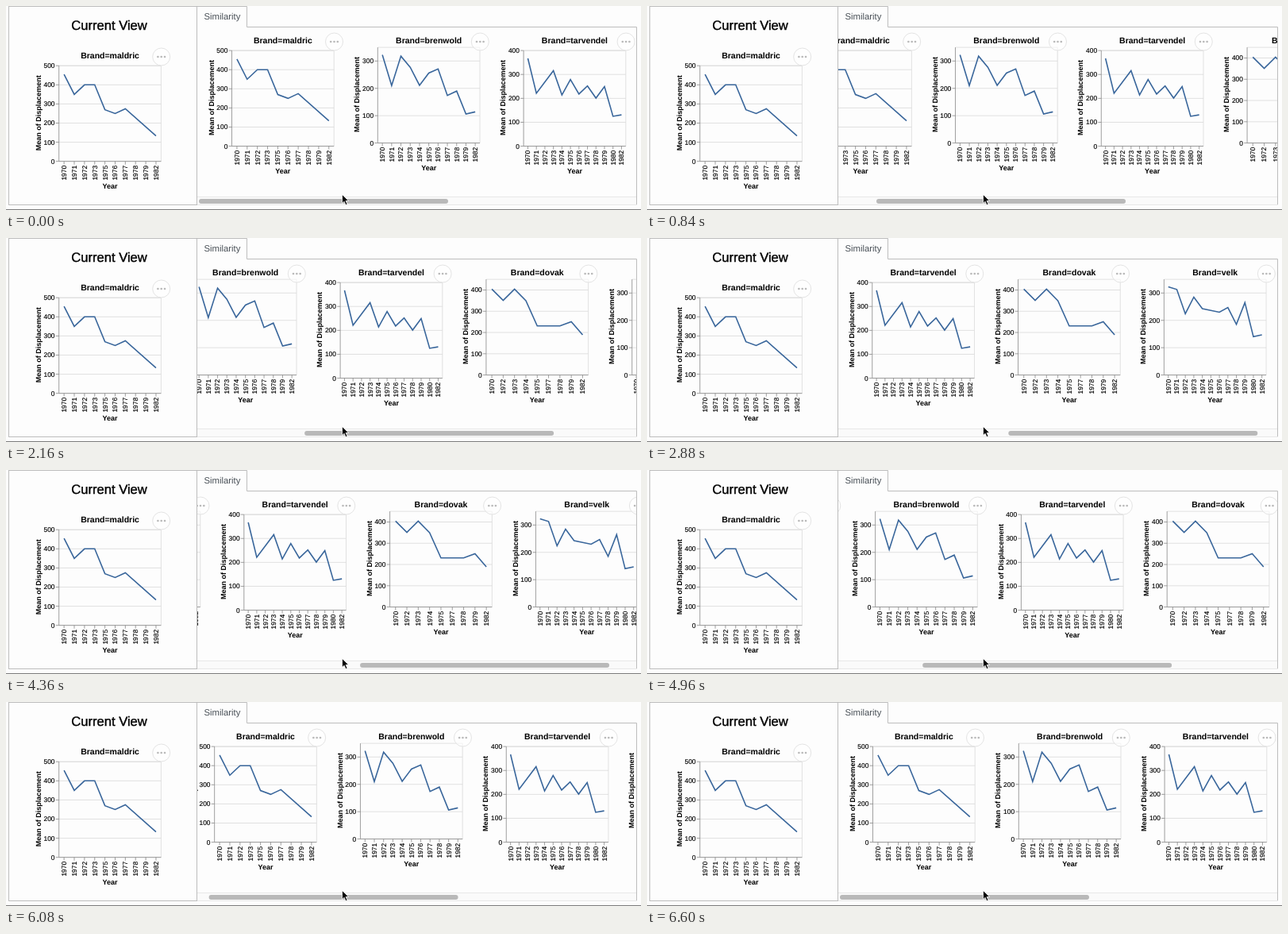
An HTML page for the animation above (7760 ms loop, 800 px wide and 257 px high).

```html
<!DOCTYPE html>
<html lang="en">
<head>
<meta charset="utf-8">
<title>Similarity view</title>
<style>
  html, body { margin: 0; width: 100%; height: 100%; overflow: hidden; background: #fdfdfd; }
  svg { display: block; font-family: "Liberation Sans", Arial, sans-serif; text-rendering: geometricPrecision; }
  .panel { fill: none; stroke: #bdbdbd; }
  .grid { fill: none; stroke: #dadada; stroke-width: .8; }
  .axis { fill: none; stroke: #888; stroke-width: .8; }
  .series { fill: none; stroke: #39669b; stroke-width: 1.6; }
  .label { font-size: 8.4px; stroke: #000; stroke-width: .15; }
  .axis-title { font-size: 9px; font-weight: bold; text-anchor: middle; }
  .title { font-size: 10.5px; font-weight: bold; text-anchor: middle; }
  .end { text-anchor: end; }
  .menu circle { fill: #fff; fill-opacity: .6; stroke: #e4e4e4; }
  .menu path { stroke: #bababa; stroke-width: 2.7; stroke-linecap: round; }
</style>
</head>
<body>
<svg width="800" height="257" viewBox="0 0 800 257">
  <defs><clipPath id="view"><rect x="241" y="27" width="554" height="213"/></clipPath></defs>
  <rect width="800" height="257" fill="#fdfdfd"/>
  <path d="M0 256.5H800" stroke="#7c7c7c"/>
  <rect class="panel" x="3.5" y=".5" width="237" height="250"/>
  <text x="130" y="30.3" font-size="16.6" text-anchor="middle" stroke="#000" stroke-width=".4">Current View</text>
  <g id="current"></g>

  <text x="249.5" y="17.2" font-size="11.3" fill="#495057">Similarity</text>
  <g clip-path="url(#view)"><g id="strip"></g></g>
  <rect x="241" y="240" width="554" height="10" fill="#fafafa"/>
  <path d="M241 240.5H795M241 250.5H795" stroke="#e8e8e8"/>
  <rect id="thumb" x="243" y="243" width="314" height="6" rx="3" fill="#b9b9b9"/>
  <path class="panel" d="M241 .5H303.5V26.5H794.5V250"/>
  <path d="M423.5 237.5v11.2l2.6-2.4 1.9 4.3 2-.9-1.9-4.2h3.6z" fill="#000" stroke="#fff" stroke-width=".8"/>
</svg>
<script>
const LOOP = 7760, STEP = 40;
const PLOT_W = 128.7, PLOT_H = 120.5, SPACING = 183.8;
const SCROLL_RATIO = 1.735, DECAY = 4;

// Key values only: blanks lie on the straight line between their neighbours.
const brands = [
  { name: "maldric", missing: [1974, 1980], keys: [455, 350, 400, 400, 270, 250, 275, , , 133] },
  { name: "brenwold", missing: [1980], keys: [323, 210, 318, 277, 211, 256, 271, 174, 190, 106, 114] },
  { name: "tarvendel", missing: [], keys: [367, 221, , 316, 214, 279, 218, 252, 201, 249, 125, 131] },
  { name: "dovak", missing: [1971, 1976, 1980], keys: [404, 351, 404, 350, 231, , 231, 251, 189] },
  { name: "velk", missing: [], keys: [323, 313, 224, 285, 243, , 230, 247, 185, 265, 140, 147] }
];

const swipes = [
  { start: 480, end: 1360, to: 120, attack: 1.6 },
  { start: 1760, end: 3240, to: 372, attack: 1.53 },
  { start: 4040, end: 5240, to: 165, attack: 2.8 },
  { start: 5360, end: 6600, to: 0, attack: 1.7 }
];

const text = (cls, x, y, str, turned) =>
  `<text class="${cls}" transform="translate(${x} ${y})${turned ? " rotate(-90)" : ""}">${str}</text>`;
const path = (cls, d) => `<path class="${cls}" d="${d}"/>`;

const yearsWithout = missing =>
  Array.from({ length: 13 }, (_, i) => 1970 + i).filter(year => year !== 1981 && !missing.includes(year));
const domainMax = keys => Math.ceil(Math.max(...keys.filter(Boolean)) / 50) * 50;

function chart({ name, missing, keys }, left, top, titleY) {
  const years = yearsWithout(missing), max = domainMax(keys);
  const bottom = top + PLOT_H, right = left + PLOT_W, middle = left + PLOT_W / 2;
  const xAt = i => left + PLOT_W * (i + .5) / years.length;
  const yAt = value => bottom - PLOT_H * value / max;
  let grid = `M${left} ${top}H${right}V${bottom}`;
  let axis = `M${left} ${top}V${bottom}H${right}`;
  let labels = "";
  for (let value = 0; value <= max; value += 100) {
    const y = yAt(value);
    grid += `M${left} ${y}H${right}`;
    axis += `M${left - 4} ${y}H${left}`;
    labels += text("label end", left - 5.2, y + 2.9, value);
  }
  years.forEach((year, i) => {
    axis += `M${xAt(i)} ${bottom}v4`;
    labels += text("label end", xAt(i) + 2.9, bottom + 5.2, year, true);
  });
  const points = [];
  keys.forEach((value, i) => points.push(`${xAt(i)} ${yAt(value)}`));
  return path("grid", grid) + path("axis", axis) + path("series", "M" + points.join("L")) + labels
    + text("axis-title", middle, bottom + 34.3, "Year")
    + text("axis-title", left - 22.9, top + PLOT_H / 2 - .8, "Mean of Displacement", true)
    + text("title", middle, titleY, "Brand=" + name)
    + `<g class="menu" transform="translate(${right + .3} ${titleY - 1.8})"><circle r="11"/>`
    + `<path d="M-4.3 0h.01M0 0h.01M4.3 0h.01"/></g>`;
}

function scrollAt(time) {
  let scroll = 0;
  for (const { start, end, to, attack } of swipes) {
    const u = Math.min(1, Math.max(0, (time - start) / (end - start)));
    scroll += (to - scroll) * (1 - (1 - u ** attack) ** DECAY);
  }
  return scroll;
}

const current = document.getElementById("current");
const strip = document.getElementById("strip");
const thumb = document.getElementById("thumb");
current.innerHTML = chart(brands[0], 66.7, 75.2, 65.8);
strip.innerHTML = brands.map((brand, i) =>
  chart(brand, 284.5 + i * SPACING, domainMax(brand.keys) % 100 ? 52.1 : 56.1, 46.8)).join("");

function draw() {
  const time = Math.floor(performance.now() % LOOP / STEP) * STEP;
  const scroll = scrollAt(time);
  strip.setAttribute("transform", `translate(${-scroll} 0)`);
  thumb.setAttribute("x", 243 + scroll / SCROLL_RATIO);
  requestAnimationFrame(draw);
}
draw();
</script>
</body>
</html>
```
